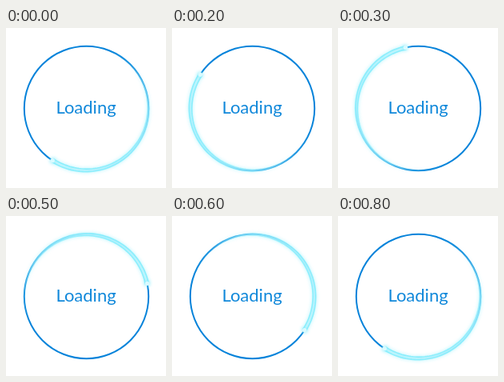
Recreate the animation shown at these times as an HTML page with a canvas. Size 200 by 200 pixels, loop 0.9 s.

```html
<!DOCTYPE html>
<html lang="en">
<head>
<meta charset="utf-8">
<title>Loading</title>
<style>
html, body { margin: 0; width: 100%; height: 100%; overflow: hidden; background: #fff; }
canvas, svg { position: absolute; left: 0; top: 0; width: 200px; height: 200px; }
text { font: 400 22px Lato, "Open Sans", sans-serif; fill: #1088da; text-anchor: middle; }
</style>
</head>
<body>
<canvas id="ring" width="200" height="200"></canvas>
<svg viewBox="0 0 200 200"><text x="100" y="106.7">Loading</text></svg>
<script>
const ctx = document.getElementById('ring').getContext('2d');
const CENTER = 100.5, RADIUS = 77.7;
const LOOP = 900, STEP = 100;
const TURN = Math.PI / 4;
const FIRST_HEAD = 123 * Math.PI / 180;
const SPAN = 195 * Math.PI / 180;
const CYAN = '125,236,252', PALE = '218,250,255';

const point = (angle, r) => [CENTER + r * Math.cos(angle), CENTER + r * Math.sin(angle)];

function fade(tail, rgb, strength) {
  const g = ctx.createConicGradient(tail, CENTER, CENTER);
  const end = SPAN / (2 * Math.PI);
  const stops = [[0, 0], [end * 0.15, 0.1], [end * 0.4, 0.6], [end * 0.6, 0.9],
                 [end, 1], [0.7, 1], [0.75, 0], [1, 0]];
  for (const [at, alpha] of stops) g.addColorStop(at, `rgba(${rgb},${alpha * strength})`);
  return g;
}

// A band that widens from tail to head on both sides of the ring.
function trailShape(tail) {
  const path = new Path2D();
  const count = 90;
  const edge = (i, side) => {
    const t = i / count;
    return point(tail + SPAN * t, RADIUS - 0.3 + side * (0.3 + 1.8 * t));
  };
  for (let i = 0; i <= count; i++) path.lineTo(...edge(i, 1));
  for (let i = count; i >= 0; i--) path.lineTo(...edge(i, -1));
  path.closePath();
  return path;
}

function glow(blur) {
  ctx.shadowColor = `rgb(${CYAN})`;
  ctx.shadowBlur = blur;
}

function draw(head) {
  const tail = head - SPAN;
  const trail = trailShape(tail);
  ctx.clearRect(0, 0, 200, 200);

  ctx.lineWidth = 2;
  ctx.strokeStyle = '#0683da';
  ctx.beginPath();
  ctx.arc(CENTER, CENTER, RADIUS, 0, 2 * Math.PI);
  ctx.stroke();

  ctx.save();
  ctx.lineJoin = 'round';
  ctx.fillStyle = fade(tail, PALE, 1);
  ctx.fill(trail);
  glow(4);
  ctx.lineWidth = 1.6;
  ctx.strokeStyle = fade(tail, CYAN, 0.85);
  ctx.stroke(trail);

  glow(5);
  ctx.fillStyle = `rgb(${PALE})`;
  ctx.beginPath();
  ctx.arc(...point(head, RADIUS), 2.7, 0, 2 * Math.PI);
  ctx.fill();
  ctx.restore();
}

const start = performance.now();
let shown = -1;

function tick() {
  const step = Math.floor(((performance.now() - start) % LOOP) / STEP);
  if (step !== shown) {
    draw(FIRST_HEAD + step * TURN);
    shown = step;
  }
  requestAnimationFrame(tick);
}
tick();
</script>
</body>
</html>
```
